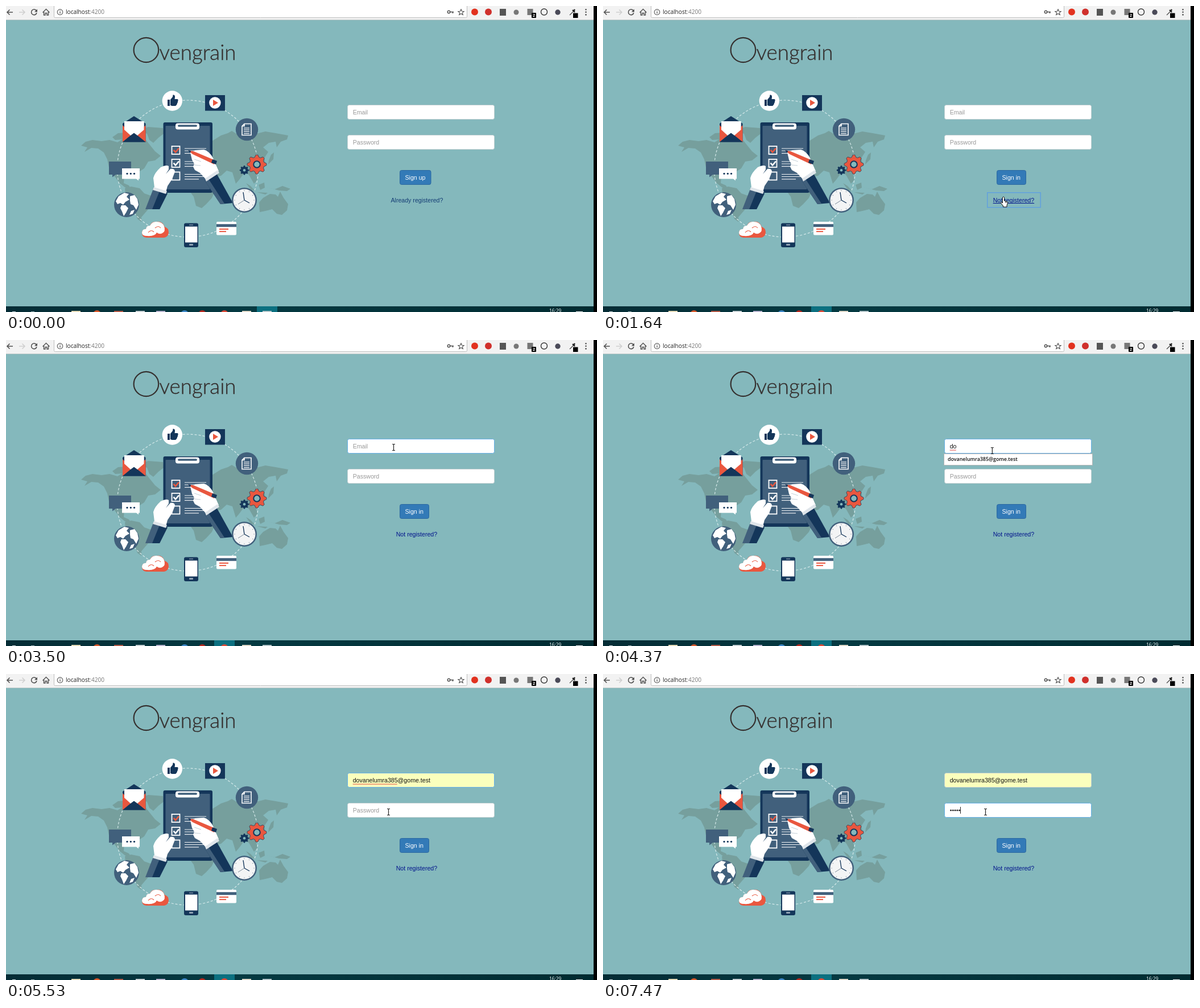
Recreate the animation shown at these times as an HTML page with a canvas. Size 1039 by 539 pixels, loop 8000 ms.

```html
<!DOCTYPE html>
<html lang="en">
<head>
<meta charset="utf-8">
<title>Sign in</title>
<style>
html, body { margin: 0; width: 100%; height: 100%; overflow: hidden; background: #000; }
canvas { display: block; }
</style>
</head>
<body>
<canvas id="stage" width="1039" height="539"></canvas>
<script>
const W = 1039, H = 539, LOOP = 8000;
const TEAL = '#84b8bc', NAVY = '#14365a', SLATE = '#41607c', RED = '#e9573f', WHITE = '#fff', PALE = '#eef1f4';
const SANS = '"Liberation Sans", Arial, sans-serif';
const UI = '"Open Sans", "Noto Sans", sans-serif';
const FORM_FONT = '10.6px ' + SANS;
const MAIL = 'dovanelumra385@gome.test';
const MAIL_NAME = MAIL.split('@')[0];

const screen = document.getElementById('stage').getContext('2d');
const backdrop = document.createElement('canvas');
backdrop.width = W;
backdrop.height = H;
let g = backdrop.getContext('2d');

// ---------- drawing helpers ----------
function rect(x, y, w, h, fill) {
  g.fillStyle = fill;
  g.fillRect(x, y, w, h);
}
function round(x, y, w, h, r, fill, stroke, lw = 1) {
  g.beginPath();
  g.roundRect(x, y, w, h, r);
  if (fill) { g.fillStyle = fill; g.fill(); }
  if (stroke) { g.strokeStyle = stroke; g.lineWidth = lw; g.stroke(); }
}
function disc(x, y, r, fill, stroke, lw = 1) {
  g.beginPath();
  g.arc(x, y, r, 0, 7);
  if (fill) { g.fillStyle = fill; g.fill(); }
  if (stroke) { g.strokeStyle = stroke; g.lineWidth = lw; g.stroke(); }
}
function shape(d, fill) {
  g.fillStyle = fill;
  g.fill(new Path2D(d));
}
function line(d, stroke, lw = 1) {
  g.strokeStyle = stroke;
  g.lineWidth = lw;
  g.stroke(new Path2D(d));
}
function text(s, x, y, font, fill) {
  g.font = font;
  g.fillStyle = fill;
  g.fillText(s, x, y);
}
function widthOf(s, font = FORM_FONT) {
  g.font = font;
  return g.measureText(s).width;
}

// ---------- fixed parts ----------
function drawToolbar() {
  rect(0, 0, 1033, 24, '#f2f2f2');
  rect(0, 24, 1033, 1, '#b9c4c5');
  round(84.5, -3, 726, 23.5, 2, WHITE, '#bdbdbd');
  const ink = '#505050';
  line('M12 11H2M6.5 6.5L2 11L6.5 15.5', ink, 1.5);
  line('M23 11H33M28.5 6.5L33 11L28.5 15.5', '#cfcfcf', 1.5);
  line('M53.2 8A4.8 4.8 0 1 0 54 12', ink, 1.6);
  shape('M55 5.5V10.5H50Z', ink);
  line('M64.5 11.5L70.5 5.5L76.5 11.5M66.5 10V16H69V12.5H72V16H74.5V10', ink, 1.4);
  disc(95, 10.7, 4.8, null, '#5a5a5a', 1.1);
  rect(94.4, 10, 1.3, 3.5, '#5a5a5a');
  rect(94.4, 7.8, 1.3, 1.3, '#5a5a5a');
  const url = '10.1px ' + UI;
  text('localhost', 105, 14.3, url, '#222');
  text(':4200', 105 + widthOf('localhost', url), 14.3, url, '#777');
  disc(778.5, 10.5, 2.2, null, ink, 1.5);
  line('M781 10.5H787M785.5 10.5V13', ink, 1.6);
  line('M800 5.8L801.5 9.2L805.2 9.5L802.4 11.9L803.3 15.5L800 13.5L796.7 15.5L797.6 11.9L794.8 9.5L798.5 9.2Z', ink, 1.1);

  disc(824, 10.5, 6, '#e2321f');
  disc(848, 10.5, 6, '#d0302c');
  rect(868, 5, 11, 12, '#555');
  disc(897, 11, 4.5, '#777');
  rect(916.5, 5, 10, 11, '#777');
  round(924, 12, 8, 9, 1, '#000');
  text('2', 926, 19.3, 'bold 7.5px ' + SANS, WHITE);
  disc(946, 10.5, 5.5, null, '#333', 1.4);
  disc(970, 11, 4.7, '#4a4a58');
  line('M991 16L998 9', '#555', 1.5);
  line('M996 7L1000 11M998 9L1000 6', '#222', 2.4);
  rect(997, 12.5, 8.5, 8.5, '#000');
  for (const y of [6.2, 10.8, 15.4]) disc(1019.5, y, 1.3, ink);
}

function drawTitle() {
  const ink = '#35302f';
  g.beginPath();
  g.ellipse(246.4, 77.5, 21.8, 21.6, 0, 0, 7);
  g.strokeStyle = ink;
  g.lineWidth = 2.2;
  g.stroke();
  text('vengrain', 269.5, 95, '300 36.8px Lato, sans-serif', ink);
  g.lineWidth = .4;
  g.strokeText('vengrain', 269.5, 95);
}

function drawMap() {
  const land = '#769f9d';
  const parts = [
    'M132 246L140 239L152 236L168 238L182 236L196 240L206 234L230 238L246 236L254 246L262 256L272 264L262 272L250 274L243 286L234 292L230 302L222 297L208 299L207 312L216 316L222 326L216 325L200 312L190 299L181 284L178 270L172 258L162 251L150 250L138 257L143 249Z',
    'M187 231L197 224L211 223L218 228L206 235L192 236Z',
    'M232 219L250 213L276 215L277 225L268 232L259 241L252 236L248 225Z',
    'M209 321L220 318L235 321L243 330L260 336L257 347L250 358L244 365L238 372L238 380L231 375L226 360L216 344L210 332Z',
    'M316 286L335 279L360 287L368 300L377 306L368 324L362 338L352 349L344 356L334 352L330 336L320 322L308 314L305 300Z',
    'M310 262L321 246L336 239L350 233L362 238L378 228L390 224L397 220L405 225L420 222L436 226L456 221L474 224L496 228L494 235L483 239L476 249L474 239L462 241L452 249L461 257L454 268L457 280L448 290L439 294L442 306L436 313L428 299L421 291L410 306L404 313L398 293L388 290L378 299L367 301L359 286L345 274L332 276L316 272Z',
    'M466 262L471 258L470 270L461 279L462 272Z',
    'M422 312L430 317L438 326L430 323ZM444 315L454 311L455 320L447 324ZM458 319L472 323L486 317L500 322L494 326L480 325ZM441 328L460 329L456 332Z',
    'M445 346L452 338L464 331L474 332L478 336L482 327L488 338L496 349L494 360L485 368L476 366L468 358L456 361L446 363Z'
  ];
  parts.forEach(d => shape(d, land));
  g.beginPath();
  g.ellipse(319.5, 286.5, 124, 120.5, 0, 0, 7);
  g.strokeStyle = '#d5e9ea';
  g.lineWidth = 1.2;
  g.setLineDash([4, 3]);
  g.stroke();
  g.setLineDash([]);
}

function drawClipboard() {
  round(276.5, 205, 86.5, 124, 3, NAVY);
  round(280.5, 211, 78, 112, 1, SLATE);
  round(298, 206.5, 42, 11, 4, WHITE);
  round(302, 209.2, 34, 3.6, 1.8, SLATE);
  [247, 270, 292.5].forEach((y, i) => {
    g.strokeStyle = WHITE;
    g.lineWidth = 1.8;
    g.strokeRect(291.5, y, 14, 14);
    for (const dy of [4, 8, 12.5]) line(`M314 ${y + dy}H${dy > 10 ? 339 : 352}`, PALE, 1.2);
    if (i < 2) line(`M294.5 ${y + 6.5}L298 ${y + 10.5}L304 ${y + 3.5}`, i ? WHITE : RED, 2.6);
  });
}

function drawHands() {
  shape('M259 322L284 330L270 358H245Z', SLATE);
  shape('M270 326L284 330L270 358H257Z', NAVY);
  shape('M261 320L259 303Q261 294 272 284Q282 279 286 282L286 288L281 296L289 287Q297 286 297 292L292 305L284 317L281 328L260 322Z', WHITE);
  shape('M260 319L283 326L281 331L258 324Z', '#dfe5ea');

  shape('M349 307L369 293L399 347L377 349Z', NAVY);
  shape('M349 307L355 303L384 348L377 349Z', SLATE);
  shape('M324 258L333 254L348 253Q358 256 364 268L374 291L352 306L341 294L332 289L329 283L331 278L327 271Z', WHITE);
  shape('M350 304L372 289L375 294L352 309Z', '#dfe5ea');
  line('M331 270L343 274M331 280L342 281', '#c5d0d8', 1);
  shape('M320.5 254.5L330 256L368 272L366 279L328 261Z', RED);
  shape('M363 270L371 273L369 279L361 276Z', NAVY);
  shape('M320 254L325 255L324 259Z', NAVY);
}

function gear(x, y, r, teeth, fill, edge) {
  g.beginPath();
  for (let i = 0; i < teeth * 4; i++) {
    const a = (i - .5) * Math.PI / (teeth * 2);
    const d = i % 4 < 2 ? r : r * .77;
    g.lineTo(x + d * Math.cos(a), y + d * Math.sin(a));
  }
  g.closePath();
  g.fillStyle = fill;
  g.fill();
  if (edge) { g.strokeStyle = edge; g.lineWidth = 1; g.stroke(); }
  disc(x, y, r * .34, TEAL, NAVY, r * .12);
}

function drawBadges() {
  // thumb
  disc(292.3, 167, 17.7, WHITE);
  shape('M284 165H288V176H284ZM289 165L293 160L293.5 156.5Q297.5 156 297 161L296.5 164H301.5Q303.5 165 302 168Q302.5 170 301 171Q301 174 299.5 174.5Q299 176 297 176H292L289 175Z', NAVY);
  // video
  rect(350, 157, 35, 27.5, NAVY);
  disc(367.4, 170.5, 10.2, WHITE);
  shape('M364 165V176L373 170.5Z', RED);
  // document
  disc(423.5, 217.5, 19.7, SLATE);
  line('M419 207.5H431V227.5H415V211.5ZM419 207.5V211.5H415', WHITE, 1.6);
  for (const y of [215, 218.2, 221.4, 224.6]) line(`M418 ${y}H428`, WHITE, 1.2);
  // envelope
  shape('M205 207L225 194L245.5 207V239.5H205Z', NAVY);
  rect(208, 203, 34.5, 27, WHITE);
  shape('M205 210L224 229L205 239.5Z', RED);
  shape('M245.5 210L226 229L245.5 239.5Z', RED);
  shape('M205 239.5L225 223L245.5 239.5Z', NAVY);
  shape('M208 203H242.5V218L231 228L225 223.500L219 228L208 218Z', WHITE);
  // chat
  shape('M181 274H220V297H193L187 301.5V297H181Z', SLATE);
  shape('M204 286H235V304.5H233V307.5L229 304.5H204Z', WHITE);
  for (const x of [213, 219.3, 225.5]) disc(x, 295.3, 1.6, NAVY);
  // gears
  gear(441, 279, 17, 8, RED, '#3c4b5c');
  gear(419, 289.3, 8.3, 8, NAVY);
  // clock
  disc(419, 342, 22, SLATE);
  disc(419, 342, 19.5, '#f3f4f5');
  for (let i = 0; i < 12; i++) {
    const a = i * Math.PI / 6;
    disc(419 + 17 * Math.cos(a), 342 + 17 * Math.sin(a), .7, '#8a97a5');
  }
  line('M419 342L417 328M419 342L428 347', NAVY, 1.4);
  line('M419 342L408 349', '#7c8a99', 1);
  // globe
  disc(212, 350, 22, SLATE);
  shape('M193 344L198 335L208 329L216 331L212 336L217 341L210 345L206 350L201 347L196 349Z', WHITE);
  shape('M203 351L210 351L215 356L211 364L207 370L204 362L201 356Z', WHITE);
  shape('M218 335L226 333L231 340L233 350L229 359L224 351L219 349L218 343Z', WHITE);
  shape('M220 361L226 359L223 366L217 368Z', WHITE);
  // cloud
  shape('M247 408Q239 407 239 400Q239 393 246 393Q247 387 253 387Q256 379 264 380Q275 378 279 389Q286 391 286 399Q285 407 278 408Z', RED);
  shape('M248 405Q239 405 239 399Q240 392 246 393Q247 386 253 387Q257 379 265 380Q275 380 278 388Q281 397 275 400Q270 403 265 399Q262 406 248 405Z', WHITE);
  line('M250 399Q255 393 260 398M262 391Q268 386 272 391', RED, 1.1);
  // phone
  round(313, 382.5, 25, 42.5, 3, NAVY);
  rect(315, 388.5, 21.5, 28, WHITE);
  rect(322, 385, 7, 1.2, '#8fa1b3');
  round(322, 419, 7, 3, 1, '#8fa1b3');
  // card
  round(370, 380, 35, 23.5, 2, WHITE);
  rect(370, 384.2, 35, 5, SLATE);
  rect(375, 392, 16, 2, RED);
  rect(375, 396.2, 12, 2, RED);
}

function drawBackdrop() {
  rect(0, 0, W, H, '#000');
  rect(0, 24, 1033, 505, TEAL);
  drawToolbar();
  drawTitle();
  drawMap();
  drawClipboard();
  drawHands();
  drawBadges();
}

// ---------- changing parts ----------
function drawTaskbar(activeX) {
  const tint = g.createLinearGradient(0, 0, 1033, 0);
  tint.addColorStop(0, '#052c35');
  tint.addColorStop(.4, '#053a42');
  tint.addColorStop(1, '#012b31');
  rect(0, 529, 1033, 10, tint);
  rect(activeX, 529, 36, 10, '#0c7080');
  const tips = [[123, '#e8dcb8'], [198, '#b55a48'], [236, '#c9d2d6'], [272, '#b9b4d0'], [423, '#e0d8c8'], [459, '#b8c8cc']];
  for (const [x, c] of tips) rect(x - 8, 537, 16, 2, c);
  const dots = [[160, '#d9592c'], [314, '#3d87c8'], [345, '#b7281f'], [384, '#dc4a38']];
  for (const [x, c] of dots) disc(x, 543, 7, c);
  rect(11, 538, 6, 1, '#cfdde0');
  rect(44, 538, 6, 1, '#9bb3b8');
  text('16:29', 955, 540, '8.3px ' + UI, WHITE);
  rect(1002, 538, 12, 1, WHITE);
}

function drawField(y, focused, fill = WHITE) {
  round(600.5, y, 258, 25, 3, fill, focused ? '#66afe9' : '#c3d0d2');
}

function wavy(x1, x2, y) {
  g.beginPath();
  for (let x = x1; x <= x2; x++) g.lineTo(x, y + (x % 3 ? .5 : -.4));
  g.strokeStyle = '#e03030';
  g.lineWidth = 1;
  g.stroke();
}

const X = 609.7;
function drawEmail(s) {
  drawField(174.5, s.focus === 'email', s.full || s.preview ? '#faffbd' : WHITE);
  const shown = s.full || s.preview ? MAIL : s.typed;
  text(shown || 'Email', X, 191, FORM_FONT, shown ? '#111' : '#999');
  if (s.preview) {
    const from = X + widthOf(s.typed), all = widthOf(MAIL);
    rect(from, 181, X + all - from, 12.5, '#3390f5');
    text(MAIL.slice(s.typed.length), from, 191, FORM_FONT, WHITE);
  }
  if (shown && s.focus === 'email') wavy(X, X + widthOf(s.full ? MAIL_NAME : s.typed), 193.5);
  if (s.focus === 'email' && s.caret) rect(Math.round(X + widthOf(shown)), 181, 1, 12, '#222');
}

function drawPassword(s) {
  drawField(227.5, s.focus === 'password');
  if (!s.dots) text('Password', X, 243.7, FORM_FONT, '#999');
  for (let i = 0; i < s.dots; i++) disc(611.6 + i * 3.72, 240.2, 1.35, '#222');
  if (s.focus === 'password' && s.caret) rect(Math.round(X + s.dots * 3.72), 234, 1, 12, '#222');
}

function drawActions(s, hover) {
  const label = s.signIn ? 'Sign in' : 'Sign up';
  round(692.5, 289.5, s.signIn ? 51 : 54.5, 25, 3, '#337ab7', '#2b68a0');
  text(label, 701.5, 306, FORM_FONT, WHITE);
  const link = s.signIn ? 'Not registered?' : 'Already registered?';
  const x = s.signIn ? 685.7 : 676.5;
  const focused = s.focus === 'link';
  const ink = s.signIn || hover ? '#00128b' : '#143c74';
  text(link, x, 345.8, FORM_FONT, ink);
  if (hover || focused) rect(x, 347, widthOf(link), 1, ink);
  if (focused) {
    g.strokeStyle = '#5f9fe0';
    g.lineWidth = 1.4;
    g.strokeRect(s.signIn ? 675.7 : 666.5, 328.7, s.signIn ? 93.5 : 112, 26);
  }
}

function drawSuggestion(lit) {
  rect(599, 200, 262, 20.5, lit ? '#cde0fb' : WHITE);
  if (!lit) {
    g.strokeStyle = '#b5b5b5';
    g.lineWidth = 1;
    g.strokeRect(599.5, 200.5, 261, 20);
  }
  text(MAIL, 606, 213.3, '600 8.9px ' + UI, '#111');
}

function drawPointer(kind, x, y) {
  g.save();
  g.translate(x, y);
  g.lineJoin = 'round';
  if (kind === 'beam') {
    line('M-2.5 -5.5H-1Q0 -5.5 0 -4.5V4.5Q0 5.5 -1 5.5H-2.5M2.5 -5.5H1Q0 -5.5 0 -4.5M2.5 5.5H1Q0 5.5 0 4.5', '#222', 1.2);
  } else {
    const d = kind === 'hand'
      ? 'M-2 -8Q0 -10 1 -8V-2L6 -.5Q7 0 7 2L5.5 6V9H-1V7L-5.5 1.5Q-5 -.5 -2 2Z'
      : 'M0 -6V6.5L2.8 3.8L4.6 8L6.5 7.2L4.7 3.2H8.5Z';
    shape(d, WHITE);
    line(d, '#111', 1);
    if (kind === 'hand') line('M3 -1V2M5 -.5V2', '#111', .8);
  }
  g.restore();
}

// ---------- timeline ----------
// [start, end, intervals, from, to]: the pointer advances in discrete steps
const MOVES = [
  [300, 770, 6, [478, 533], [704.5, 345]],
  [2330, 2490, 2, [704.5, 345], [661, 239]],
  [2490, 2964, 6, [661, 239], [681.5, 189]],
  [4370, 4680, 4, [681.5, 189], [691, 209]],
  [5150, 5530, 5, [691, 209], [672.5, 243]]
];
const DOT_TIMES = [6310, 6550, 6780, 6920, 7470];
const within = (t, a, b) => t >= a && t < b;

function pointerAt(t) {
  const move = MOVES.filter(m => t >= m[0]).pop();
  if (!move) return null;
  const [start, end, n, a, b] = move;
  const step = Math.min(n, Math.floor((t - start) * n / (end - start)));
  const p = (step + 1) / (n + 1);
  const k = 1 - (1 - p) ** 1.6;
  return [a[0] + (b[0] - a[0]) * k, a[1] + (b[1] - a[1]) * k];
}

function stateAt(t) {
  const pos = pointerAt(t);
  const menu = within(t, 3660, 4840);
  return {
    pos, menu,
    signIn: t >= 1547,
    focus: t >= 5610 ? 'password' : t >= 2964 ? 'email' : t >= 1470 ? 'link' : '',
    typed: MAIL.slice(0, t < 3660 ? 0 : t < 3810 ? 1 : 2),
    preview: menu && pos[1] > 200,
    full: t >= 4840,
    dots: DOT_TIMES.filter(d => t >= d).length,
    caret: !(within(t, 3500, 3660) || within(t, 4370, 4840) || within(t, 5370, 5610) || within(t, 6160, 6310))
  };
}

function pointerKind([x, y], menu) {
  if (within(x, 675, 770) && within(y, 329, 355)) return 'hand';
  if (menu && y > 200) return 'arrow';
  const inField = within(y, 175, 201) || within(y, 227, 254);
  return within(x, 600, 859) && inField ? 'beam' : 'arrow';
}

function draw(t) {
  const s = stateAt(t);
  const kind = s.pos && pointerKind(s.pos, s.menu);
  g.drawImage(backdrop, 0, 0);
  drawTaskbar(t < 1470 ? 441 : 366);
  drawEmail(s);
  drawPassword(s);
  drawActions(s, kind === 'hand');
  if (s.menu) drawSuggestion(s.preview);
  if (kind) drawPointer(kind, ...s.pos);
}

drawBackdrop();
g = screen;
const begin = performance.now();
function tick() {
  draw((performance.now() - begin) % LOOP);
  requestAnimationFrame(tick);
}
tick();
</script>
</body>
</html>
```
